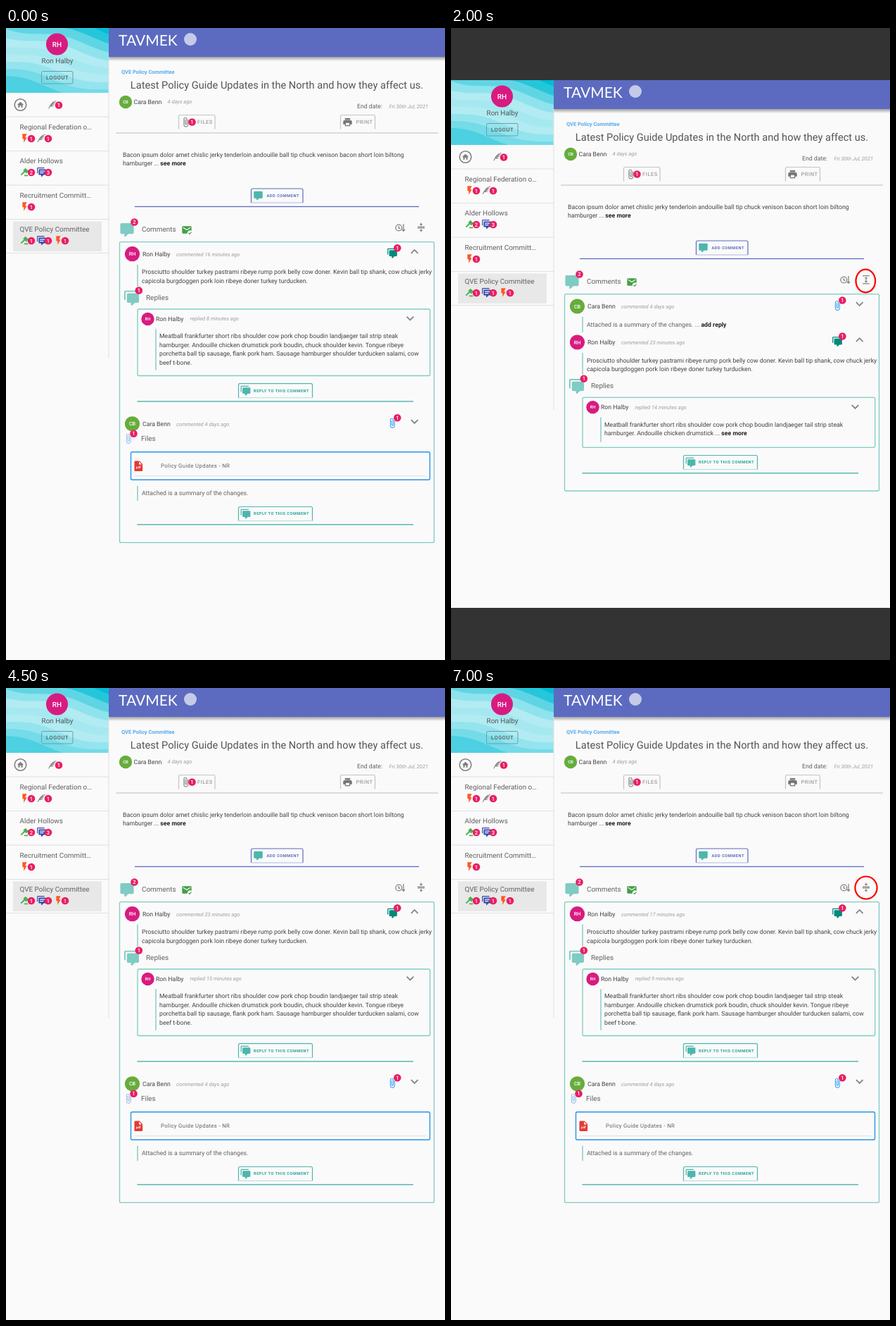
These frames come from a looping animation (624 px wide and 897 px high, 8000 ms). An HTML page with a canvas:

```html
<!DOCTYPE html>
<html lang="en">
<head>
<meta charset="utf-8">
<title>Discussion page</title>
<style>
html, body { margin: 0; width: 100%; height: 100%; overflow: hidden; background: #fafafa; }
canvas { display: block; width: 624px; height: 897px; }
</style>
</head>
<body>
<canvas id="stage" width="624" height="897"></canvas>
<script>
const ctx = document.getElementById('stage').getContext('2d');
ctx.textRendering = 'geometricPrecision';
const INK = '#424242', SOFT = '#616161', GREY = '#9e9e9e', ICON = '#858585';
const TEAL = '#4db6ac', PALE = '#80cbc4', INDIGO = '#5c6bc0', BADGE = '#e91e63';
const BODY = 8.735, SMALL = 7.46, LARGE = 9.94;
const RON = { name: 'Ron Halby', initials: 'RH', color: '#d81b80' };
const CARA = { name: 'Cara Benn', initials: 'CB', color: '#66ad3c' };

const SCENES = [
  { until: 500, expanded: true, comment: 16, reply: 8 },
  { until: 3000, expanded: false, comment: 23, reply: 14, ring: [589.3, 285, 13.8, 16.3] },
  { until: 5500, expanded: true, comment: 23, reply: 15 },
  { until: 8000, expanded: true, comment: 17, reply: 9, ring: [590, 283.5, 15.6, 16] }
];

// Icons on a 24 unit grid
const ICONS = {
  comment: 'M9,22A1,1 0 0,1 8,21V18H4A2,2 0 0,1 2,16V4A2,2 0 0,1 4,2H20A2,2 0 0,1 22,4V16A2,2 0 0,1 20,18H13.9L10.2,21.7Q10,22 9.5,22Z',
  comments: 'M12,23A1,1 0 0,1 11,22V19H7A2,2 0 0,1 5,17V7A2,2 0 0,1 7,5H21A2,2 0 0,1 23,7V17A2,2 0 0,1 21,19H16.9L13.2,22.7Q13,23 12.5,23ZM3,15H1V3A2,2 0 0,1 3,1H19V3H3Z',
  lines: 'M8,8.5H20V10.5H8ZM8,13H17V15H8Z',
  flash: 'M7,2V13H10V22L17,10H13L17,2Z',
  gavel: 'M2,18L10.5,9.5L8,8L14,2L21.5,9.5L15.5,15.5L13,12L4,20ZM11,19H20V22H11Z',
  feather: 'M22,2C22,2 14.4,1.6 8.3,9.9C3.7,16.2 2,22 2,22L3.9,21C5.4,18.5 6.1,17.5 7.5,16C10,16.7 12.7,16.6 15,14C13,13.4 11.4,13.6 9,13.8C11.7,12 13.5,11.6 16,12L17,10C15.2,9.7 14,9.6 12.2,10C14.2,8.6 15.6,7.9 18,8L19.2,6C17.6,6 16.7,6.1 14.9,6.6C16.5,5.1 18,4.4 20.1,4.3Z',
  home: 'M12,5L4.5,12H7V18H10.5V13.5H13.5V18H17V12H19.5Z',
  clip: 'M16.5,6V17.5A4,4 0 0,1 8.5,17.5V5A2.5,2.5 0 0,1 13.5,5V15.5A1,1 0 0,1 11.5,15.5V6H10V15.5A2.5,2.5 0 0,0 15,15.5V5A4,4 0 0,0 7,5V17.5A5.5,5.5 0 0,0 18,17.5V6Z',
  printer: 'M18,3H6V7H18ZM16,19H8V14H16ZM19,8H5A3,3 0 0,0 2,11V17H6V21H18V17H22V11A3,3 0 0,0 19,8Z',
  up: 'M7.4,15.4L12,10.8L16.6,15.4L18,14L12,8L6,14Z',
  down: 'M7.4,8.6L12,13.2L16.6,8.6L18,10L12,16L6,10Z',
  mail: 'M13,19C13,15.7 15.7,13 19,13Q20.7,13 22,13.8V6A2,2 0 0,0 20,4H4A2,2 0 0,0 2,6V18A2,2 0 0,0 4,20H13.1ZM4,8V6L12,11L20,6V8L12,13ZM17.7,22.2L15,19.2L16.2,18L17.7,19.6L21.3,16L22.5,17.4Z',
  collapse: 'M4,12H20V14H4ZM4,9H20V11H4ZM16,4L12,8L8,4H11V1H13V4ZM8,19L12,15L16,19H13V22H11V19Z',
  expand: 'M13,9V15H16L12,19L8,15H11V9H8L12,5L16,9ZM4,2H20V4H4ZM4,20H20V22H4Z',
  file: 'M14,2H6A2,2 0 0,0 4,4V20A2,2 0 0,0 6,22H18A2,2 0 0,0 20,20V8ZM13,3.5V9H18.5Z'
};
for (const name in ICONS) ICONS[name] = new Path2D(ICONS[name]);

// All helpers place things by their vertical centre.
function text(str, x, y, size = BODY, color = INK, { style = '', align = 'left', spacing = 0, family = 'Roboto' } = {}) {
  ctx.font = `${style} ${size}px ${family}, sans-serif`;
  ctx.letterSpacing = spacing + 'px';
  ctx.textAlign = align;
  ctx.fillStyle = color;
  ctx.fillText(str, x, y + size * 0.35);
  return x + ctx.measureText(str).width;
}

function icon(name, x, y, size, color) {
  ctx.save();
  ctx.translate(x - size / 2, y - size / 2);
  ctx.scale(size / 24, size / 24);
  ctx.fillStyle = color;
  ctx.fill(ICONS[name], 'evenodd');
  ctx.restore();
}

function rect(x, y, w, h, color) {
  ctx.fillStyle = color;
  ctx.fillRect(x, y, w, h);
}

function disc(x, y, r, color) {
  ctx.fillStyle = color;
  ctx.beginPath();
  ctx.arc(x, y, r, 0, Math.PI * 2);
  ctx.fill();
}

function box(x, y, w, h, color, width = 1.3) {
  ctx.strokeStyle = color;
  ctx.lineWidth = width;
  ctx.beginPath();
  ctx.roundRect(x, y, w, h, 2);
  ctx.stroke();
}

function line(x1, x2, y, color, width = 1) {
  rect(x1, y - width / 2, x2 - x1, width, color);
}

function bar(x, y1, y2) {
  rect(x - 0.7, y1, 1.4, y2 - y1, PALE);
}

function badge(x, y, count = 1) {
  disc(x, y, 5.3, BADGE);
  text(count, x, y, 7.6, '#fff', { align: 'center', style: '500' });
}

function avatar(person, x, y, r, size) {
  disc(x, y, r, person.color);
  text(person.initials, x, y, size, '#fff', { align: 'center', style: '500' });
}

function openBox(x, y, w, h, color) {
  ctx.strokeStyle = color;
  ctx.lineWidth = 1.2;
  ctx.beginPath();
  ctx.moveTo(x, y + h);
  ctx.lineTo(x, y + 2);
  ctx.quadraticCurveTo(x, y, x + 2, y);
  ctx.lineTo(x + w - 2, y);
  ctx.quadraticCurveTo(x + w, y, x + w, y + 2);
  ctx.lineTo(x + w, y + h);
  ctx.stroke();
}

function paragraph(lines, x, y, more) {
  lines.forEach((str, i) => {
    const end = text(str, x, y + i * 12.4);
    if (more && i === lines.length - 1) text(more, end + 2, y + i * 12.4, BODY, '#212121', { style: 'bold' });
  });
}

function waves() {
  const shades = ['#26c6da', '#5fd5e4', '#8ee3ed', '#b2ebf2', '#a6e8f0', '#b2ebf2', '#94e4ee', '#74dbe8', '#4dd0e1'];
  ctx.save();
  ctx.beginPath();
  ctx.rect(0, 0, 146, 92);
  ctx.clip();
  rect(0, 0, 146, 92, '#00bcd4');
  shades.forEach((shade, i) => {
    ctx.fillStyle = shade;
    ctx.beginPath();
    ctx.moveTo(0, 95);
    for (let x = 0; x <= 148; x += 4) {
      ctx.lineTo(x, i * 12 - 26 + x * 0.22 + 4.5 * Math.sin(x / 21 + i * 0.45));
    }
    ctx.lineTo(148, 95);
    ctx.fill();
  });
  ctx.restore();
}

function sidebar() {
  waves();
  avatar(RON, 72.5, 23, 15.5, 10);
  text(RON.name, 73, 46.5, LARGE, '#555', { align: 'center' });
  box(50.5, 61.5, 44.5, 17.5, '#6a9ea6', 1);
  text('LOGOUT', 57, 70, SMALL, '#555', { style: '500', spacing: 0.6 });

  ctx.strokeStyle = '#808080';
  ctx.lineWidth = 1.6;
  ctx.beginPath();
  ctx.arc(20.5, 109, 8.3, 0, Math.PI * 2);
  ctx.stroke();
  icon('home', 20.5, 109, 15, '#808080');
  icon('feather', 66, 109, 14, ICON);
  badge(75, 109.5);

  rect(10, 274.5, 126, 42.5, '#e8e8e8');
  const groups = [
    ['Regional Federation o…', 141, ['flash', 1], ['feather', 1]],
    ['Alder Hollows', 189, ['gavel', 2], ['comments', 3]],
    ['Recruitment Committ…', 238, ['flash', 1]],
    ['QVE Policy Committee', 286, ['gavel', 1], ['comments', 1], ['flash', 1]]
  ];
  const colors = { flash: '#ff5722', feather: ICON, gavel: '#4caf50', comments: '#3949ab' };
  for (const [name, y, ...marks] of groups) {
    text(name, 19.5, y, LARGE, SOFT);
    marks.forEach(([kind, count], i) => {
      const x = 26.5 + i * 24;
      icon(kind, x, y + 15.5, kind === 'flash' ? 15 : 14, colors[kind]);
      if (kind === 'comments') icon('lines', x, y + 15.5, 14, '#fff');
      badge(x + 9.5, y + 16, count);
    });
  }
  for (const y of [126, 174.5, 223, 271.5, 319.5]) line(0, 146, y, '#e0e0e0');
  rect(145.5, 41, 1, 427, '#e0e0e0');
}

function header() {
  const shadow = ctx.createLinearGradient(0, 41, 0, 47);
  shadow.addColorStop(0, 'rgba(0,0,0,.36)');
  shadow.addColorStop(1, 'rgba(0,0,0,0)');
  rect(146, 41, 478, 6, shadow);
  rect(146, 0, 478, 41, INDIGO);
  text('TAVMEK', 160, 18, 21, '#fff', { family: 'Lato' });
  disc(262, 16, 9, '#c5cae9');

  text('QVE Policy Committee', 164, 62, SMALL, '#55a9ee', { style: 'bold' });
  text('Latest Policy Guide Updates in the North and how they affect us.', 385, 81, 14.6, '#555', { align: 'center' });
  avatar(CARA, 170, 105, 9.2, 6);
  text(CARA.name, 181.5, 104.5);
  text('4 days ago', 229.5, 104.5, SMALL, GREY, { style: 'italic' });
  text('End date:', 499, 111, BODY, SOFT);
  text('Fri 30th Jul, 2021', 600, 111.5, SMALL, GREY, { style: 'italic', align: 'right' });

  const label = { style: '500', spacing: 0.6 };
  openBox(245.5, 123.5, 51.5, 20, '#c4c4c4');
  icon('clip', 255.5, 133.5, 15, '#757575');
  badge(264.5, 133.5);
  text('FILES', 272, 133.5, SMALL, GREY, label);
  openBox(475.5, 123.5, 49, 20, '#c4c4c4');
  icon('printer', 485.5, 133.5, 15, '#757575');
  text('PRINT', 497.5, 133.5, SMALL, GREY, label);
  line(156, 614, 149, '#bdbdbd');

  paragraph([
    'Bacon ipsum dolor amet chislic jerky tenderloin andouille ball tip chuck venison bacon short loin biltong',
    'hamburger ...'
  ], 166, 179.5, 'see more');
  openBox(348.5, 228, 73.5, 20, INDIGO);
  line(349, 422, 248, '#b4bbe0');
  icon('comment', 358.5, 238, 15, TEAL);
  text('ADD COMMENT', 370.5, 238, 5.7, INDIGO, { style: 'bold', spacing: 0.5 });
  line(183, 587, 253.5, INDIGO, 1.3);
}

function commentsBar(expanded) {
  icon('comment', 172, 286.5, 23, PALE);
  badge(182.5, 275.5, 2);
  text('Comments', 193, 286, LARGE, SOFT);
  icon('mail', 257, 286.5, 16, '#43a047');
  ctx.strokeStyle = ICON;
  ctx.lineWidth = 1.3;
  ctx.beginPath();
  ctx.arc(558.3, 283.5, 4.4, 0, Math.PI * 2);
  ctx.moveTo(558.3, 281);
  ctx.lineTo(558.3, 284);
  ctx.lineTo(560.3, 284.5);
  ctx.moveTo(565, 278);
  ctx.lineTo(565, 288);
  ctx.moveTo(563, 286);
  ctx.lineTo(565, 288.3);
  ctx.lineTo(567, 286);
  ctx.stroke();
  icon(expanded ? 'collapse' : 'expand', 590, 283.3, 15, ICON);
}

function commentHead(person, ago, y, kind, color, arrow) {
  avatar(person, 179.5, y, 10.6, 7.2);
  text(person.name, 194, y);
  text(`commented ${ago} ago`, 242, y + 0.3, SMALL, GREY, { style: 'italic' });
  icon(kind, 549, y - 1, 15, color);
  badge(556.3, y - 8.5);
  icon(arrow, 580.7, y - 3.3, 22, ICON);
}

function replyButton(y) {
  openBox(330.5, y, 105, 20, TEAL);
  line(331, 436, y + 20, '#b2dfdb');
  icon('comments', 340.5, y + 10, 15, TEAL);
  text('REPLY TO THIS COMMENT', 352, y + 10, 5.7, '#26a69a', { style: 'bold', spacing: 0.5 });
  line(186.5, 579, y + 25.3, TEAL, 1.4);
}

function thread(y, scene) {
  commentHead(RON, `${scene.comment} minutes`, y, 'comments', '#00897b', 'up');
  bar(187, y + 15, y + 46);
  paragraph([
    'Prosciutto shoulder turkey pastrami ribeye rump pork belly cow doner. Kevin ball tip shank, cow chuck jerky',
    'capicola burgdoggen pork loin ribeye doner turkey turducken.'
  ], 193, y + 25.5);
  icon('comments', 178.5, y + 62.5, 23, PALE);
  badge(188.8, y + 51.8);
  text('Replies', 199, y + 62, LARGE, SOFT);

  const height = scene.expanded ? 94.5 : 71;
  box(187, y + 78.3, 415.7, height, PALE);
  avatar(RON, 201.5, y + 92.3, 9.2, 6);
  text(RON.name, 213, y + 92);
  text(`replied ${scene.reply} minutes ago`, 261.5, y + 92, SMALL, GREY, { style: 'italic' });
  icon('down', 574.5, y + 91.5, 22, ICON);
  bar(213, y + 106.5, y + 70.5 + height);
  const opening = 'Meatball frankfurter short ribs shoulder cow pork chop boudin landjaeger tail strip steak';
  if (scene.expanded) {
    paragraph([
      opening,
      'hamburger. Andouille chicken drumstick pork boudin, chuck shoulder kevin. Tongue ribeye',
      'porchetta ball tip sausage, flank pork ham. Sausage hamburger shoulder turducken salami, cow',
      'beef t-bone.'
    ], 218, y + 116.7);
  } else {
    paragraph([opening, 'hamburger. Andouille chicken drumstick ...'], 218, y + 116.7, 'see more');
  }
  replyButton(y + 89.5 + height);
}

function attachment(y) {
  icon('clip', 174, y + 21, 15, '#90b8e8');
  badge(181.5, y + 14);
  text('Files', 192, y + 21, LARGE, SOFT);
  box(177.5, y + 40, 425, 39.5, '#2a93ea', 1.4);
  icon('file', 188.3, y + 60, 17.5, '#e53935');
  text('pdf', 188.3, y + 62, 4.6, '#fff', { style: 'italic bold', align: 'center' });
  text('Policy Guide Updates - NR', 220, y + 59.5, 7.8, SOFT, { spacing: 0.33 });
  line(183, 597, y + 74, '#dcdcdc');
  bar(187, y + 88, y + 109.5);
  text('Attached is a summary of the changes.', 193, y + 98.3, BODY, SOFT);
  replyButton(y + 117.7);
}

function discussion(scene) {
  commentsBar(scene.expanded);
  box(161.5, 303.6, 447, scene.expanded ? 426.8 : 279.4, PALE);
  if (scene.expanded) {
    thread(320.7, scene);
    commentHead(CARA, '4 days', 561.8, 'clip', '#2196f3', 'down');
    attachment(561.8);
  } else {
    commentHead(CARA, '4 days', 321, 'clip', '#2196f3', 'down');
    bar(187, 336, 358);
    const end = text('Attached is a summary of the changes. ...', 193, 346.7, BODY, SOFT);
    text('add reply', end + 2, 346.7, BODY, '#212121', { style: 'bold' });
    thread(372, scene);
  }
  if (scene.ring) {
    ctx.strokeStyle = '#f00';
    ctx.lineWidth = 2.2;
    ctx.beginPath();
    ctx.ellipse(...scene.ring, 0, 0, Math.PI * 2);
    ctx.stroke();
  }
}

function render(now) {
  const time = now % 8000;
  const scene = SCENES.find(s => time < s.until);
  const top = scene.expanded ? 0 : 74;
  rect(0, 0, 624, 897, '#333');
  ctx.save();
  ctx.beginPath();
  ctx.rect(0, top, 624, 897 - top * 2);
  ctx.clip();
  ctx.translate(0, top);
  rect(0, 0, 624, 897, '#fafafa');
  header();
  sidebar();
  discussion(scene);
  ctx.restore();
  requestAnimationFrame(render);
}
requestAnimationFrame(render);
</script>
</body>
</html>
```
